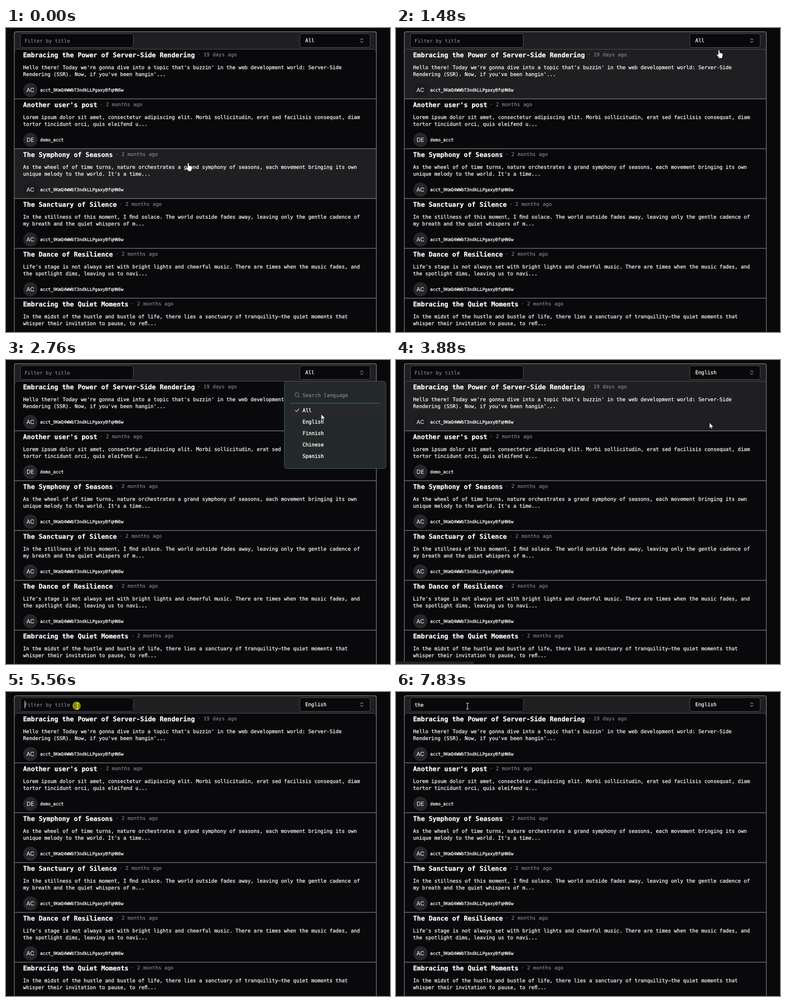
These frames come from a looping animation (843 px wide and 665 px high, 8 s). An HTML page:

```html
<!DOCTYPE html>
<html lang="en">
<head>
<meta charset="utf-8">
<title>Post list filter</title>
<style>
  html, body { margin: 0; width: 100%; height: 100%; overflow: hidden; background: #09090b; }
  svg { display: block; width: 843px; height: 665px; }
  text { font-family: "DejaVu Sans Mono", monospace; font-size: 11.07px; fill: #fafafa; stroke: #fafafa; stroke-width: .3; white-space: pre; text-rendering: geometricPrecision; }
  .title { font-size: 14.24px; font-weight: bold; }
  .muted { fill: #98989f; stroke: none; }
  .user { font-size: 9.5px; stroke-width: .35; }
  .initials { font: 12.5px Inter, sans-serif; text-anchor: middle; stroke: none; }
  .item { stroke-width: .4; }
  .line { fill: none; stroke: #747478; stroke-width: 1.5; }
  .box { fill: #09090b; stroke: #55555c; }
  .icon { fill: none; stroke: #85858a; stroke-width: 1.1; stroke-linecap: round; stroke-linejoin: round; }
  .cursor { fill: #fff; stroke: #000; stroke-width: .8; stroke-linejoin: round; }
</style>
</head>
<body>
<svg id="stage" viewBox="0 0 843 665">
  <rect width="843" height="665" fill="#09090b"/>
  <rect x="19" y="9" width="794" height="38" fill="#1f1f21"/>
  <g id="rows"></g>
  <path class="line" d="M18.3 665V12q0-3.7 4-3.7H809q4 0 4 3.7V665"/>
  <path d="M19.5 51q0-4.5 4-4.5H808q4 0 4 4.5" fill="none" stroke="#55555a"/>

  <rect id="ring" x="29.5" y="10.5" width="252.5" height="34" rx="5" fill="#09090b" stroke="#36363b"/>
  <rect class="box" x="31.5" y="12.5" width="248" height="30" rx="4"/>
  <text id="query" x="40.7" y="32"></text>
  <rect id="caret" y="19" width="1" height="17" fill="#fff"/>

  <rect class="box" x="645" y="12.5" width="154.5" height="30" rx="4"/>
  <text id="choice" x="657" y="31"></text>
  <path class="icon" d="M778 26l3-3 3 3M778 29l3 3 3-3"/>

  <path id="status" d="M0 659.5H168q3 0 3 3V665H0Z" fill="#232325"/>

  <g id="menu">
    <rect x="611" y="46.5" width="223" height="191" rx="5" fill="#222a29" stroke="#525a59"/>
    <circle class="icon" cx="638.3" cy="75.8" r="4.2"/>
    <path class="icon" d="M641.4 79l2.6 2.6"/>
    <text class="muted" x="651" y="81">Search language</text>
    <rect id="menuCaret" x="651" y="68" width="1" height="17" fill="#fff"/>
    <path d="M624 94.5H821.5" stroke="#656c6b"/>
    <rect x="623" y="97.5" width="199" height="25" rx="3" fill="#27282a"/>
    <path class="icon" style="stroke:#f4f4f5" d="M635 110.2l2.6 2.6 5.6-5.8"/>
    <g id="items"></g>
  </g>

  <circle id="click" r="9.2" fill="#ffff00"/>
  <g id="pointer">
    <path class="cursor" id="hand" d="M-1.6 1.5Q-1.6 0 0 0Q1.6 0 1.6 1.5V6.2Q3 5.4 4 6.7Q5.5 6.1 6.2 7.5Q8.3 7.1 8.3 9.4V12.5Q8.3 15 6.8 16.4V18.3H-.7V16.8Q-2.4 14.9-3.8 12.5L-5.2 10.2Q-5 8.2-3 9.3L-1.6 10.8Z"/>
    <path class="cursor" id="arrow" d="M0 0V12.6L2.9 9.9L4.8 14.2L6.9 13.3L5 9.2H9Z"/>
    <path id="beam" d="M-3-6.5H-1Q0-6.5 0-5.5Q0-6.5 1-6.5H3M0-5.5V5.5M-3 6.5H-1Q0 6.5 0 5.5Q0 6.5 1 6.5H3" fill="none" stroke="#fff" stroke-width="1.1"/>
  </g>
</svg>
<script>
const LOOP = 8000, PITCH = 109, TOP = 46, TITLE_ADVANCE = 8.573;
const el = id => document.getElementById(id);
const show = (id, on) => el(id).setAttribute("opacity", Number(on));

function add(parent, tag, attrs, content = "") {
  const node = document.createElementNS("http://www.w3.org/2000/svg", tag);
  for (const key in attrs) node.setAttribute(key, attrs[key]);
  node.textContent = content;
  parent.appendChild(node);
  return node;
}

const MEMBER = "acct_9KmQ4WWbT3ndkLLPgaxyBfqHN6w";
const AGE = "2 months ago";
const posts = [
  ["Embracing the Power of Server-Side Rendering", "19 days ago", MEMBER,
    "Hello there! Today we're gonna dive into a topic that's buzzin' in the web development world: Server-Side",
    "Rendering (SSR). Now, if you've been hangin'..."],
  ["Another user's post", AGE, "demo_acct",
    "Lorem ipsum dolor sit amet, consectetur adipiscing elit. Morbi sollicitudin, erat sed facilisis consequat, diam",
    "tortor tincidunt orci, quis eleifend u..."],
  ["The Symphony of Seasons", AGE, MEMBER,
    "As the wheel of of time turns, nature orchestrates a grand symphony of seasons, each movement bringing its own",
    "unique melody to the world. It's a time..."],
  ["The Sanctuary of Silence", AGE, MEMBER,
    "In the stillness of this moment, I \uFB01nd solace. The world outside fades away, leaving only the gentle cadence of",
    "my breath and the quiet whispers of m..."],
  ["The Dance of Resilience", AGE, MEMBER,
    "Life's stage is not always set with bright lights and cheerful music. There are times when the music fades, and",
    "the spotlight dims, leaving us to navi..."],
  ["Embracing the Quiet Moments", AGE, MEMBER,
    "In the midst of the hustle and bustle of life, there lies a sanctuary of tranquility\u2014the quiet moments that",
    "whisper their invitation to pause, to re\uFB02..."]
];

const rows = posts.map(([title, age, user, first, second], i) => {
  const g = add(el("rows"), "g", { transform: `translate(0 ${TOP + i * PITCH})` });
  const back = add(g, "rect", { x: 19, y: .5, width: 794, height: PITCH, rx: i ? 0 : 4 });
  const avatar = add(g, "circle", { cx: 53.5, cy: 89.5, r: 15.5 });
  add(g, "text", { class: "title", x: 37.5, y: 17.5 }, title);
  add(g, "text", { class: "muted", x: 43 + title.length * TITLE_ADVANCE, y: 16 }, "· " + age);
  add(g, "text", { x: 37.6, y: 43.5 }, first);
  add(g, "text", { x: 37.6, y: 59.2 }, second);
  add(g, "text", { class: "initials", x: 53.5, y: 94 }, user.slice(0, 2).toUpperCase());
  add(g, "text", { class: "user", x: 75, y: 92.5 }, user);
  return { back, avatar };
});

// Separators lie above every row background
posts.forEach((_, i) =>
  add(el("rows"), "path", { class: "line", d: `M19 ${TOP + (i + 1) * PITCH}H813` }));

["All", "English", "Finnish", "Chinese", "Spanish"].forEach((name, i) =>
  add(el("items"), "text", { class: "item", x: 651, y: 113.7 + 25 * i }, name));

const clamp = v => Math.min(1, Math.max(0, v));
const ramp = (t, a, b) => clamp((t - a) / (b - a));
const smooth = k => k * k * (3 - 2 * k);
const during = (t, a, b) => t >= a && t < b;

// Pointer hot spot: time, x, y
const path = [
  [310, 400, 295], [1480, 709, 48], [1880, 712, 22], [2150, 712, 22],
  [2970, 688, 137], [4410, 688, 137], [5230, 157, 31]
];

function pointerAt(t) {
  let [, x, y] = path[0];
  for (let i = 1; i < path.length; i++) {
    const [a, ax, ay] = path[i - 1], [b, bx, by] = path[i];
    if (t < a) break;
    const k = smooth(ramp(t, a, b));
    x = ax + (bx - ax) * k;
    y = ay + (by - ay) * k;
  }
  return [x, y];
}

function pointerKind(t, x, y) {
  if (y < 43 && x < 280) return "beam";
  if (during(t, 2080, 4010) || (y < TOP && x < 645)) return "arrow";
  return "hand";
}

function draw(t) {
  const [x, y] = pointerAt(t);
  const kind = pointerKind(t, x, y);
  el("pointer").setAttribute("transform", `translate(${x} ${y})`);
  for (const id of ["hand", "arrow", "beam"]) show(id, id === kind);

  const clicked = during(t, 2020, 2150) || during(t, 3410, 3610) || during(t, 5490, 5690);
  el("click").setAttribute("cx", kind === "beam" ? x - 2 : x);
  el("click").setAttribute("cy", kind === "beam" ? y - 1 : y);
  show("click", clicked ? .52 : 0);

  const open = smooth(ramp(t, 2080, 2230)) * (1 - smooth(ramp(t, 3600, 3750)));
  const scale = .95 + .05 * open;
  show("menu", open);
  el("menu").setAttribute("transform", `translate(722 46) scale(${scale}) translate(-722 -46)`);
  show("menuCaret", during(t, 2080, 2610) || during(t, 3140, 3410));
  el("choice").textContent = t < 3610 ? "All" : "English";

  const hovered = during(t, 2080, 3680) || y < 47 ? -1 : Math.floor((y - TOP) / PITCH);
  rows.forEach(({ back, avatar }, i) => {
    back.setAttribute("fill", i === hovered ? "#1f1f21" : "#09090b");
    avatar.setAttribute("fill", i === hovered ? "#1b1b1d" : "#27272a");
  });
  show("status", ramp(t, 3680, 3800) * (1 - ramp(t, 4270, 4350)));

  const typed = [6750, 6890, 7020].filter(at => t >= at).length;
  el("query").textContent = typed ? "the".slice(0, typed) : "Filter by title";
  el("query").setAttribute("class", typed ? "" : "muted");
  el("caret").setAttribute("x", 41 + Math.round(typed * 6.667));
  show("caret", during(t, 5490, 6020) || during(t, 6550, 7550));
  show("ring", t >= 5490);
}

const start = performance.now();
function tick() {
  draw((performance.now() - start) % LOOP);
  requestAnimationFrame(tick);
}
tick();
</script>
</body>
</html>
```
